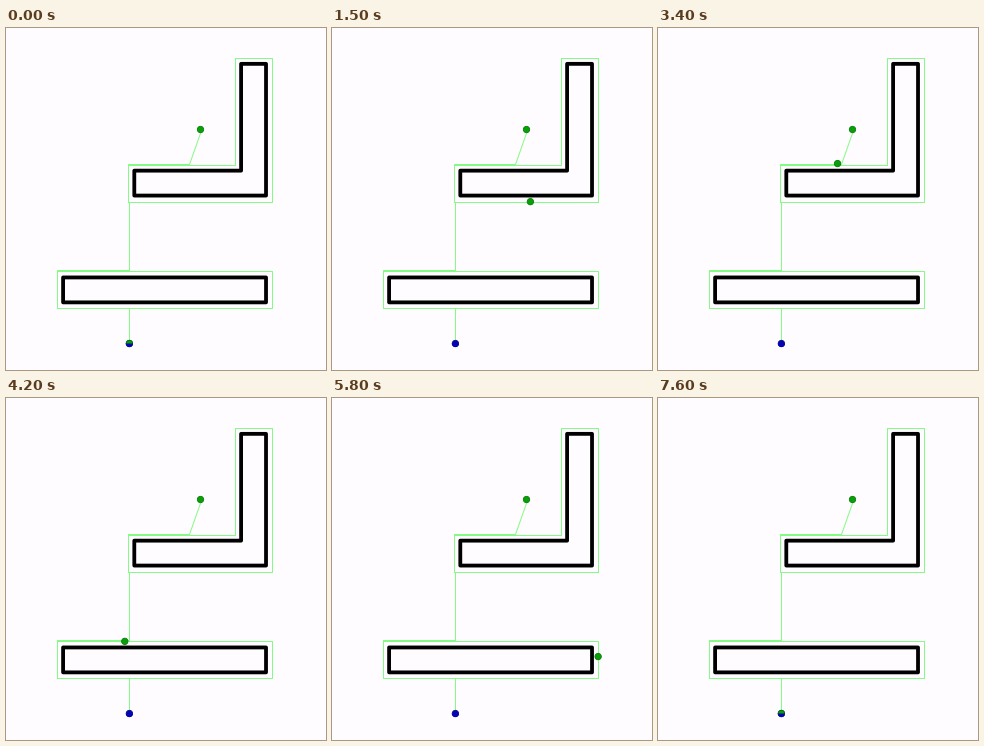
A matplotlib script for the animation above (8 s loop, 320 px wide and 342 px high).

```python
import numpy as np
import matplotlib.pyplot as plt
from matplotlib.animation import FuncAnimation
from matplotlib.patches import Circle, Polygon, Wedge

WIDTH, HEIGHT, DPI = 320, 342, 100
PX = 72 / DPI
FRAMES, INTERVAL = 80, 100
HOLD = 6                  # frames resting on the goal before the next run
STEP, LAG = 21.37, 2.8    # pixels per frame, and distance lost at the start

BACKGROUND, TRAIL = "#fefcfe", "#84fb84"
GREEN, GREEN_EDGE = "#08a008", "#067806"
BLUE, BLUE_EDGE = "#0404b4", "#040480"

UNIT, ORIGIN = 35.6, np.array([57.1, 35.85])
MARGIN = 6.1
RADIUS = 3.2
START, GOAL = np.array([194.5, 101.5]), np.array([123.4, 315.5])


def scaled(corners):
    return ORIGIN + UNIT * np.array(corners)


def grown(wall):
    return wall + MARGIN * np.where(wall == wall.max(axis=0), 1, -1)


# Corners in world units, counterclockwise from the left end of the top edge.
ell = scaled([(2, 3), (2, 3.7), (5.7, 3.7), (5.7, 0), (5, 0), (5, 3)])
bar = scaled([(0, 6), (0, 6.7), (5.7, 6.7), (5.7, 6)])


def avoid(origin, loop):
    """Full lap around a loop, then the way out to the point nearest the goal."""
    (left, top), (_, bottom) = loop[:2]
    along = (top - origin[1]) / (GOAL[1] - origin[1])
    hit = origin + along * (GOAL - origin)
    leave = np.array([GOAL[0], bottom])
    lap = [hit, *loop, hit]
    way_out = [hit - (0, 1), loop[0] - (0, 1), loop[1], leave]
    return lap, way_out


ell_loop, bar_loop = grown(ell), grown(bar)
ell_lap, ell_out = avoid(START, ell_loop)
bar_lap, bar_out = avoid(ell_out[-1], bar_loop)

shortest = [START, *ell_out, *bar_out, GOAL]
route = np.array([START, *ell_lap, *ell_out, *bar_lap, *bar_out, GOAL])
travelled = np.append(0, np.cumsum(np.hypot(*np.diff(route, axis=0).T)))


def position(frame):
    if frame < HOLD:
        return tuple(GOAL)
    distance = STEP * (frame - HOLD + 1) - LAG
    return tuple(np.interp(distance, travelled, axis) for axis in route.T)


fig = plt.figure(figsize=(WIDTH / DPI, HEIGHT / DPI), dpi=DPI,
                 facecolor=BACKGROUND)
ax = fig.add_axes([0, 0, 1, 1])
ax.set_xlim(0, WIDTH)
ax.set_ylim(HEIGHT, 0)
ax.axis("off")


def trail(points):
    ax.plot(*np.transpose(points), color=TRAIL, lw=PX, snap=True, zorder=1)


def dot(center, face, edge, zorder):
    return ax.add_patch(Circle(center, RADIUS, facecolor=face, edgecolor=edge,
                               lw=0.8 * PX, zorder=zorder))


for wall, loop in ((ell, ell_loop), (bar, bar_loop)):
    trail([*loop, loop[0]])
    ax.add_patch(Polygon(wall, closed=True, facecolor=BACKGROUND,
                         edgecolor="black", lw=3.8 * PX, joinstyle="round",
                         snap=False, zorder=2))
trail(shortest)
dot(START, GREEN, GREEN_EDGE, 3)
dot(GOAL, BLUE, BLUE_EDGE, 3)
robot = dot(position(0), GREEN, GREEN_EDGE, 4)
# The lower half of the goal stays visible under the robot.
ax.add_patch(Wedge(GOAL, RADIUS + 0.4, 0, 180, color=BLUE, lw=0, zorder=5))


def update(frame):
    robot.center = position(frame)
    return [robot]


anim = FuncAnimation(fig, update, frames=FRAMES, interval=INTERVAL,
                     repeat=True, repeat_delay=0)
plt.show()
```
